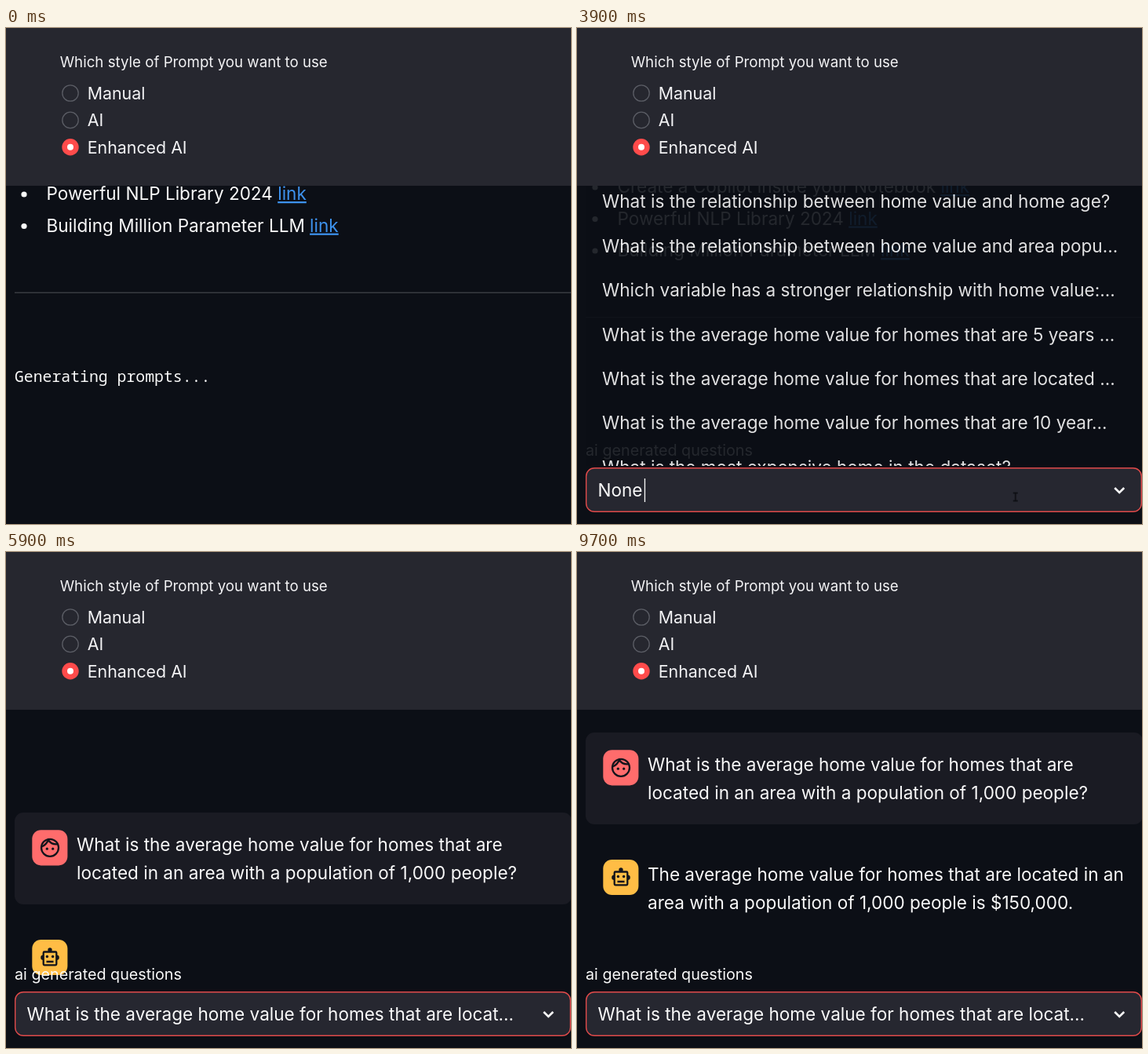
Recreate the animation shown at these times as an HTML page. Size 720 px wide and 632 px high, loop 9900 ms.

```html
<!DOCTYPE html>
<html lang="en">
<head>
<meta charset="utf-8">
<title>Prompt assistant</title>
<style>
html, body { margin: 0; width: 100%; height: 100%; overflow: hidden; background: #0c0f16; }
svg { display: block; width: 720px; height: 632px; }
text { font: 22.56px Inter, sans-serif; fill: #fafafa; white-space: pre; }
.small { font-size: 19.74px; }
.head text { font-size: 21.36px; fill: #f3f3f5; }
.head .small { font-size: 18.7px; }
.mono { font: 19.8px "Noto Sans Mono", monospace; }
.link { fill: #3d91ec; text-decoration: underline; }
.icon { fill: none; stroke: #12141b; stroke-width: 2.3; }
.ink { fill: #12141b; stroke: none; }

/* One loop: 1% is 99 ms */
.t { animation: 9.9s step-end infinite; }
#wait { animation-name: wait; }
#skeleton { animation-name: skeleton; }
#list { animation-name: list; }
#form { animation-name: form; }
#focus { animation-name: focus; }
#none { animation-name: none-text; }
#picked { animation-name: picked; }
#noneCaret { animation-name: none-caret; }
#pickedCaret { animation-name: picked-caret; }
#menu { animation-name: menu; animation-timing-function: linear; }
#hover { animation-name: hover; }
#mouse { animation-name: mouse; animation-timing-function: linear; }
#arrow { animation-name: arrow; }
#beam { animation-name: beam; }
#chat { animation-name: chat; }
#scroll { animation-name: scroll; animation-timing-function: ease-in-out; }
#loading { animation-name: loading; }
#answer { animation-name: answer; }
.blink { animation: blink .825s step-end infinite; }
#spin { transform-origin: 105.5px 414.5px; animation: spin .75s linear -.3s infinite; }

@keyframes wait { 0% { opacity: 1 } 23.2%, 100% { opacity: 0 } }
@keyframes skeleton { 0% { opacity: 0 } 23.2% { opacity: 1 } 25.2%, 100% { opacity: 0 } }
@keyframes list {
  0% { opacity: 1; transform: none }
  25.2% { opacity: 1; transform: translateY(31.5px) }
  57.5%, 100% { opacity: 0; transform: translateY(31.5px) }
}
@keyframes form { 0% { opacity: 0 } 25.2%, 100% { opacity: 1 } }
@keyframes focus { 0% { opacity: 0 } 37.3%, 100% { opacity: 1 } }
@keyframes none-text { 0% { opacity: 1 } 51.5%, 100% { opacity: 0 } }
@keyframes picked { 0% { opacity: 0 } 51.5%, 100% { opacity: 1 } }
@keyframes none-caret { 0% { opacity: 0 } 37.3% { opacity: 1 } 51.5%, 100% { opacity: 0 } }
@keyframes picked-caret { 0% { opacity: 0 } 51.5% { opacity: 1 } 97.9%, 100% { opacity: 0 } }
@keyframes menu {
  0%, 37.9% { opacity: 0 } 39.39% { opacity: .9 } 40.4%, 51.4% { opacity: 1 }
  53%, 100% { opacity: 0 }
}
@keyframes hover {
  0% { opacity: 0; transform: translateY(56.4px) }
  43.4% { opacity: 1; transform: translateY(56.4px) }
  45.4%, 100% { opacity: 1; transform: none }
}
@keyframes mouse {
  0%, 30.2% { transform: translate(576px, 470px) }
  34.3%, 41.3% { transform: translate(558.7px, 597.5px) }
  46.5%, 100% { transform: translate(460px, 461px) }
}
@keyframes arrow {
  0% { opacity: 0 } 30.2% { opacity: 1 } 33.3% { opacity: 0 }
  42.4% { opacity: 1 } 57.5%, 100% { opacity: 0 }
}
@keyframes beam { 0% { opacity: 0 } 33.3% { opacity: 1 } 42.4%, 100% { opacity: 0 } }
@keyframes chat { 0% { opacity: 0 } 57.5%, 100% { opacity: 1 } }
@keyframes scroll { 0%, 60.6% { transform: translateY(102px) } 65.6%, 100% { transform: none } }
@keyframes loading { 0% { opacity: 0 } 64.6% { opacity: 1 } 82.8%, 100% { opacity: 0 } }
@keyframes answer { 0% { opacity: 0 } 82.8%, 100% { opacity: 1 } }
@keyframes blink { 0% { opacity: 0 } 50%, 100% { opacity: 1 } }
@keyframes spin { to { transform: rotate(360deg) } }
</style>
</head>
<body>
<svg viewBox="0 0 720 632">
  <defs>
    <clipPath id="menuArea"><rect y="201" width="720" height="357"/></clipPath>
  </defs>
  <rect width="720" height="632" fill="#0c0f16"/>

  <g id="list" class="t">
    <g fill="#fafafa">
      <circle cx="23" cy="171.5" r="3.6"/>
      <circle cx="23" cy="212" r="3.6"/>
      <circle cx="23" cy="252.5" r="3.6"/>
    </g>
    <text x="51.5" y="178.5">Create a Copilot inside your Notebook <tspan class="link">link</tspan></text>
    <text x="51.5" y="219">Powerful NLP Library 2024 <tspan class="link">link</tspan></text>
    <text x="51.5" y="259.6">Building Million Parameter LLM <tspan class="link">link</tspan></text>
    <path d="M11 337.3H720" stroke="#383b41" stroke-width="1.4"/>
  </g>

  <text id="wait" class="t mono" x="11" y="450.5">Generating prompts...</text>
  <rect id="skeleton" class="t" x="11" y="428" width="714" height="61.5" rx="5" fill="#1b1e23"/>

  <g id="chat" class="t"><g id="scroll" class="t">
    <rect x="11" y="230" width="710" height="117" rx="11" fill="#1a1b23"/>
    <rect x="33.3" y="252.3" width="45.1" height="45.1" rx="11.3" fill="#ff6c6c"/>
    <g class="icon">
      <circle cx="56" cy="274.8" r="11"/>
      <path d="M45.5 273.5Q51.5 271 53.8 265Q58 271.3 66.5 270.2"/>
      <circle class="ink" cx="52.3" cy="276.2" r="1.6"/>
      <circle class="ink" cx="59.7" cy="276.2" r="1.6"/>
    </g>
    <text x="90" y="279">What is the average home value for homes that are</text>
    <text x="90" y="315">located in an area with a population of 1,000 people?</text>

    <rect x="33.3" y="392" width="45.1" height="45.1" rx="11.3" fill="#ffbd45"/>
    <g class="icon">
      <rect x="47.7" y="407.5" width="16.6" height="16.8" rx="1.2"/>
      <path d="M51.5 420H60.5M56 407V404"/>
      <circle class="ink" cx="56" cy="405" r="2.7"/>
      <circle class="ink" cx="52.4" cy="413.5" r="1.7"/>
      <circle class="ink" cx="59.6" cy="413.5" r="1.7"/>
      <path class="ink" d="M47.5 411.5a3.3 3.3 0 0 0 0 6.6zM64.5 411.5a3.3 3.3 0 0 1 0 6.6z"/>
    </g>
    <g id="loading" class="t" fill="none" stroke-width="3.4">
      <circle cx="105.5" cy="414.5" r="13.8" stroke="#3b3d43"/>
      <path id="spin" d="M105.5 400.7A13.8 13.8 0 0 1 119.3 414.5" stroke="#2f83dc"/>
    </g>
    <g id="answer" class="t">
      <text x="90" y="419">The average home value for homes that are located in an</text>
      <text x="90" y="455">area with a population of 1,000 people is $150,000.</text>
    </g>
  </g></g>

  <g id="form" class="t">
    <text class="small" x="11" y="545.3">ai generated questions</text>
    <rect x="11.7" y="560.7" width="707.6" height="55.6" rx="10.5" fill="#262730"/>
    <rect id="focus" class="t" x="11.7" y="560.7" width="707.6" height="55.6" rx="10.5" fill="none" stroke="#e04a4a" stroke-width="1.4"/>
    <text id="none" class="t" x="26.5" y="597">None</text>
    <text id="picked" class="t" x="26.5" y="597">What is the average home value for homes that are locat...</text>
    <g fill="#fafafa">
      <g id="noneCaret" class="t"><rect class="blink" x="85.8" y="574" width="1.3" height="30"/></g>
      <g id="pickedCaret" class="t"><rect class="blink" x="660" y="574" width="1" height="30"/></g>
    </g>
    <path d="M685.2 586L691.2 592L697.2 586" fill="none" stroke="#fafafa" stroke-width="2.6"/>
  </g>

  <g id="menu" class="t"><g clip-path="url(#menuArea)">
    <rect x="11" y="201" width="709" height="357" fill="#0c0f16"/>
    <rect id="hover" class="t" x="11" y="419" width="709" height="56.4" fill="#1a1c24"/>
    <g id="options"></g>
  </g></g>

  <g class="head">
    <rect width="720" height="201" fill="#26272f"/>
    <text class="small" x="68.7" y="50">Which style of Prompt you want to use</text>
    <g fill="none" stroke="#5b5d65" stroke-width="1.3">
      <circle cx="82" cy="83" r="10.2"/>
      <circle cx="82" cy="117.4" r="10.2"/>
    </g>
    <circle cx="82" cy="151.8" r="10.7" fill="#ff4b4b"/>
    <circle cx="82" cy="151.8" r="4" fill="#fff"/>
    <text x="103.7" y="91">Manual</text>
    <text x="103.7" y="125.4">AI</text>
    <text x="103.7" y="159.8">Enhanced AI</text>
  </g>

  <g id="mouse" class="t">
    <path id="arrow" class="t" d="M0 0V8L1.9 6.4L3.2 9.4L4.5 8.8L3.2 6H5.4Z" fill="#f2f2f2"/>
    <path id="beam" class="t" d="M-3 -5H3M0 -5V5M-3 5H3" fill="none" stroke="#0a0b0f" stroke-width="1.4"/>
  </g>
</svg>
<script>
const questions = [
  "What is the relationship between home value and home age?",
  "What is the relationship between home value and area popu...",
  "Which variable has a stronger relationship with home value:...",
  "What is the average home value for homes that are 5 years ...",
  "What is the average home value for homes that are located ...",
  "What is the average home value for homes that are 10 year...",
  "What is the most expensive home in the dataset?"
];
document.getElementById("options").innerHTML = questions
  .map((q, i) => `<text x="32" y="${229.3 + 56.4 * i}">${q}</text>`)
  .join("");
</script>
</body>
</html>
```
